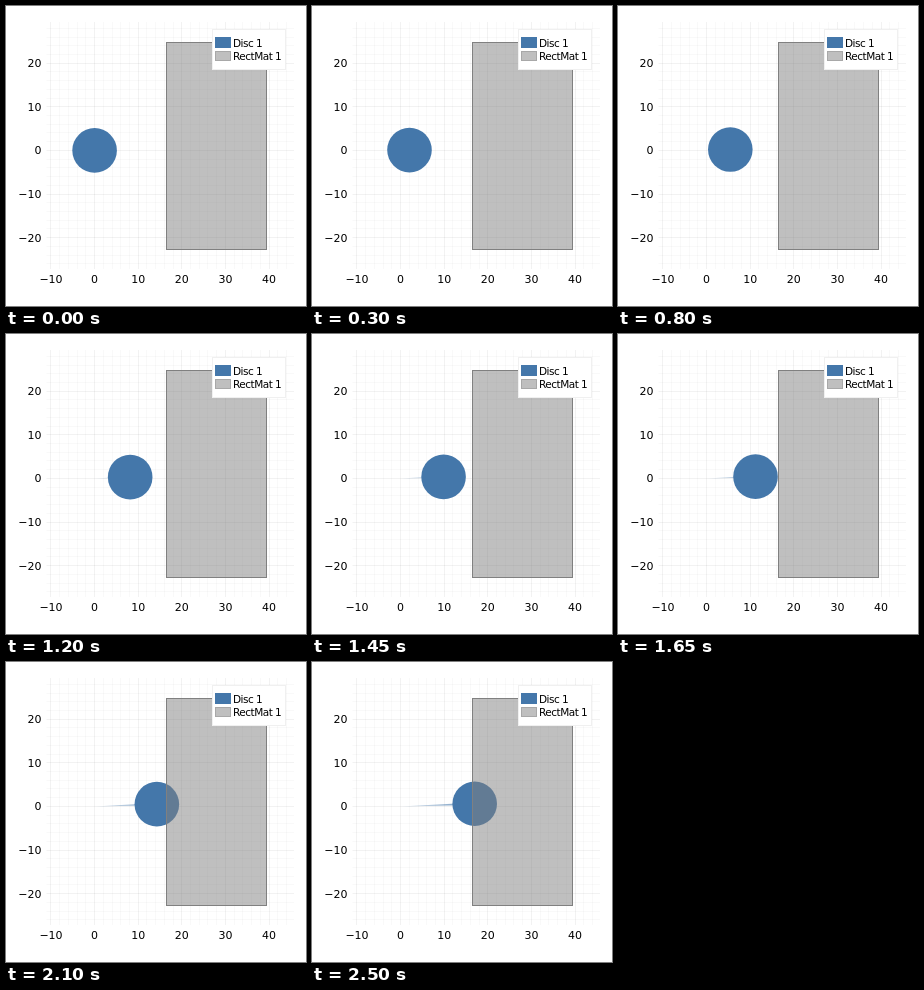
Write an HTML page with a canvas that moves like this. It is 300x300 px and loops after 2550 ms.

```html
<!DOCTYPE html>
<html lang="en">
<head>
<meta charset="utf-8">
<title>Disc approaching a slab</title>
<style>
  html, body { margin: 0; width: 100%; height: 100%; overflow: hidden; background: #fff; }
  canvas { display: block; width: 300px; height: 300px; }
</style>
</head>
<body>
<canvas id="stage" width="300" height="300"></canvas>
<script>
const ctx = document.getElementById("stage").getContext("2d");
const STEP = 50, STEPS = 51;
const BLUE = "#4477aa", GREY = "rgba(128,128,128,0.5)", EDGE = "#808080";
const SCALE = 4.36, ORIGIN = { x: 88.6, y: 144.4 };
const AREA = { left: 40.5, top: 16, right: 288, bottom: 263 };
const px = x => ORIGIN.x + x * SCALE;
const py = y => ORIGIN.y - y * SCALE;

function line(x1, y1, x2, y2, color, width = 1) {
  ctx.strokeStyle = color;
  ctx.lineWidth = width;
  ctx.beginPath();
  ctx.moveTo(x1, y1);
  ctx.lineTo(x2, y2);
  ctx.stroke();
}

function box(x, y, w, h, fill, stroke) {
  ctx.fillStyle = fill;
  ctx.fillRect(x, y, w, h);
  ctx.strokeStyle = stroke;
  ctx.lineWidth = 1;
  ctx.strokeRect(x, y, w, h);
}

function label(text, x, y, align, size) {
  ctx.font = `${size}px "DejaVu Sans", sans-serif`;
  ctx.textAlign = align;
  ctx.textBaseline = "alphabetic";
  ctx.fillStyle = "#000";
  ctx.fillText(text, x, y);
}

const tickText = v => String(v).replace("-", "\u2212");

function drawGrid() {
  for (let v = -28; v <= 46; v += 2) {
    const color = v % 10 ? "rgba(0,0,0,0.025)" : "rgba(0,0,0,0.05)";
    const x = Math.floor(px(v)) + 0.5, y = Math.floor(py(v)) + 0.5;
    if (x >= AREA.left && x <= AREA.right) line(x, AREA.top, x, AREA.bottom, color);
    if (y >= AREA.top && y <= AREA.bottom) line(AREA.left, y, AREA.right, y, color);
  }
  for (let v = -10; v <= 40; v += 10) label(tickText(v), px(v), 277, "center", 11);
  for (let v = -20; v <= 20; v += 10) label(tickText(v), 35.5, py(v) + 4, "right", 11);
}

function drawTrail(x, y) {
  const length = x - ORIGIN.x;
  const half = length * 0.018;
  const shade = ctx.createLinearGradient(ORIGIN.x, 0, ORIGIN.x + 74, 0);
  shade.addColorStop(0, "rgba(68,119,170,0.2)");
  shade.addColorStop(1, "rgba(68,119,170,0.75)");
  ctx.fillStyle = shade;
  ctx.beginPath();
  ctx.moveTo(ORIGIN.x, ORIGIN.y);
  ctx.lineTo(x, y - half);
  ctx.lineTo(x, y + half);
  ctx.fill();
}

function drawLegend() {
  box(206.5, 23.5, 73, 40, "#fff", "#f0f0f0");
  box(209.5, 31.5, 15, 10, BLUE, BLUE);
  box(209.5, 45.5, 15, 9, "#bfbfbf", "#a8a8a8");
  ctx.letterSpacing = "-0.5px";
  label("Disc 1", 227, 41, "left", 10.5);
  label("RectMat 1", 227, 54, "left", 10.5);
  ctx.letterSpacing = "0px";
}

function draw(now) {
  const step = Math.floor(now / STEP) % STEPS;
  const x = ORIGIN.x + step * 1.482, y = ORIGIN.y - step * 0.053;
  ctx.fillStyle = "#fff";
  ctx.fillRect(0, 0, 300, 300);
  drawGrid();
  drawTrail(x, y);
  ctx.fillStyle = BLUE;
  ctx.beginPath();
  ctx.arc(x, y, 22.3, 0, 2 * Math.PI);
  ctx.fill();
  box(160.5, 36.5, 100, 207, GREY, EDGE);
  drawLegend();
}

const start = performance.now();
function tick() {
  draw(performance.now() - start);
  requestAnimationFrame(tick);
}
tick();
</script>
</body>
</html>
```
